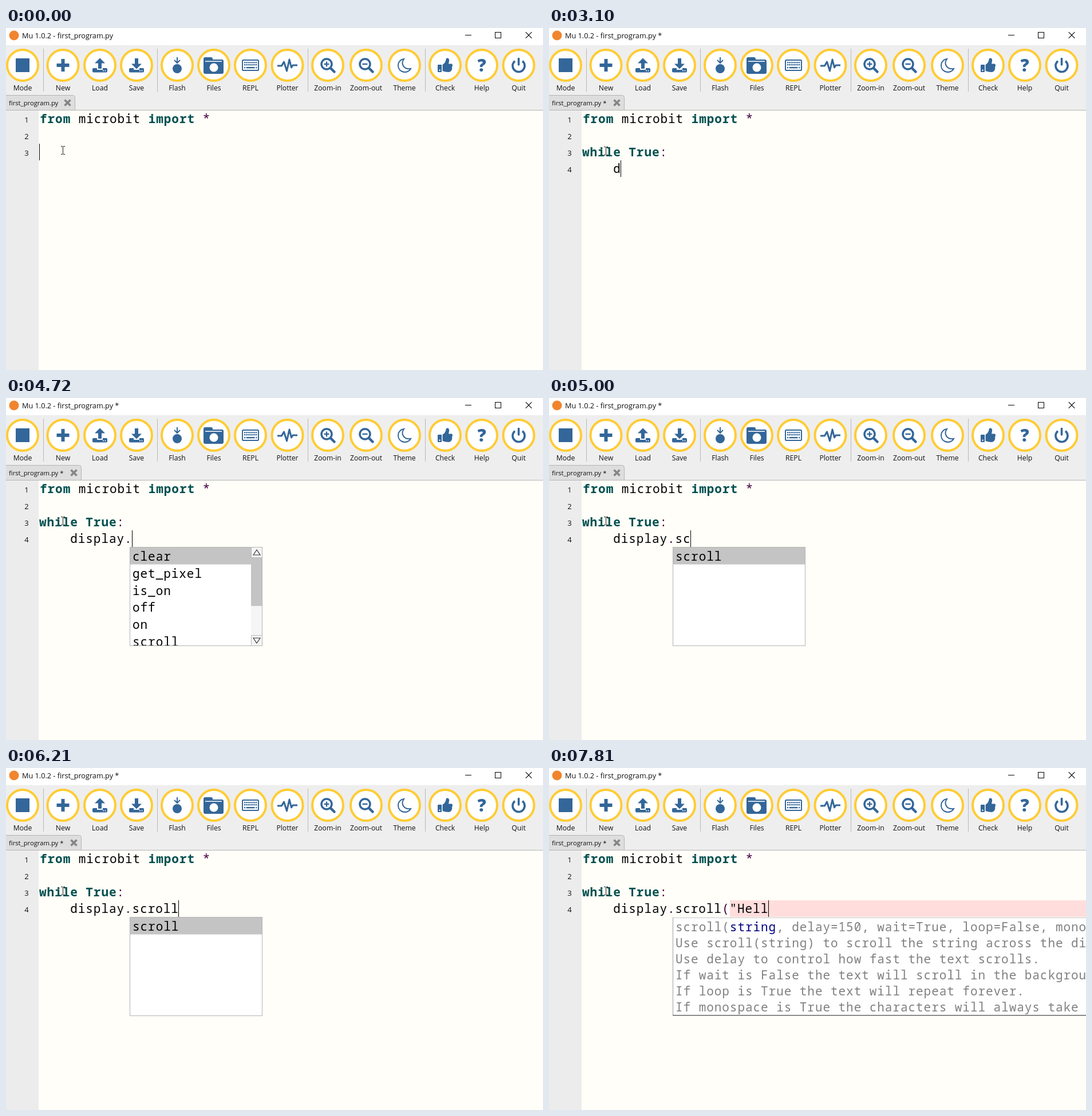
These frames come from a looping animation (938x597 px, 8000 ms). An HTML page with a canvas:

```html
<!DOCTYPE html>
<html lang="en">
<head>
<meta charset="utf-8">
<title>Code editor</title>
<style>
  html, body { margin: 0; width: 100%; height: 100%; overflow: hidden; background: #fff; }
  canvas { display: block; }
</style>
</head>
<body>
<canvas id="stage" width="938" height="597"></canvas>
<script>
const ctx = document.getElementById('stage').getContext('2d');
const LOOP = 8000, ADV = 13.55, CODE_SIZE = 21;
const BLUE = '#336699', KEYWORD = '#005050', OPERATOR = '#400040';
const UI = '"Open Sans", "Noto Sans", sans-serif';
const MONO = '"Noto Sans Mono", "DejaVu Sans Mono", monospace';

const LINE3 = 'while True:';
const KEYS3 = [110, 290, 375, 460, 670, 730, 1170, 1255, 1340, 1550, 2050];
const ENTER = 2440;
const LINE4 = 'display.scroll("Hell';
const KEYS4 = [3100, 3540, 3540, 3660, 3820, 3910, 4000, 4720, 4880, 5000, 5110,
  5160, 5380, 5440, 6270, 7110, 7390, 7570, 7690, 7810];
const CARET_OFF = [[2940, 3100], [5890, 6210], [6670, 7110]];
const POPUPS = [
  { from: 3540, to: 4720, x: 108, items: ['display'] },
  { from: 4720, to: 4880, x: 216, items: ['clear', 'get_pixel', 'is_on', 'off', 'on', 'scroll'], bar: true },
  { from: 4880, to: 5000, x: 216, items: ['scroll', 'set_pixel', 'show'] },
  { from: 5000, to: 5440, x: 216, items: ['scroll'] },
  { from: 5620, to: 6270, x: 216, items: ['scroll'] }
];
const HELP_AT = 6270, QUOTE_AT = 7110;
const HELP = [
  'Use scroll(string) to scroll the string across the display.',
  'Use delay to control how fast the text scrolls.',
  'If wait is False the text will scroll in the background.',
  'If loop is True the text will repeat forever.',
  'If monospace is True the characters will always take up'
];

function rect(x, y, w, h, color) {
  ctx.fillStyle = color;
  ctx.fillRect(x, y, w, h);
}

function frame(x, y, w, h, color) {
  ctx.strokeStyle = color;
  ctx.lineWidth = 1;
  ctx.strokeRect(x + 0.5, y + 0.5, w - 1, h - 1);
}

function path(points, closed) {
  ctx.beginPath();
  points.forEach(([x, y]) => ctx.lineTo(x, y));
  if (closed) ctx.closePath();
}

function stroke(points, color, width, closed) {
  path(points, closed);
  ctx.strokeStyle = color;
  ctx.lineWidth = width;
  ctx.stroke();
}

function fill(points, color) {
  path(points, true);
  ctx.fillStyle = color;
  ctx.fill();
}

function disc(x, y, r, color) {
  ctx.beginPath();
  ctx.arc(x, y, r, 0, 7);
  ctx.fillStyle = color;
  ctx.fill();
}

function ring(x, y, r, width, color, a = 0, b = Math.PI * 2) {
  ctx.beginPath();
  ctx.arc(x, y, r, a, b);
  ctx.strokeStyle = color;
  ctx.lineWidth = width;
  ctx.stroke();
}

function round(x, y, w, h, r, color) {
  ctx.beginPath();
  ctx.roundRect(x, y, w, h, r);
  ctx.fillStyle = color;
  ctx.fill();
}

function cross(x, y, r, color, width) {
  stroke([[x - r, y - r], [x + r, y + r]], color, width);
  stroke([[x - r, y + r], [x + r, y - r]], color, width);
}

function label(text, x, y, size, align = 'left', color = '#111') {
  ctx.font = `${size}px ${UI}`;
  ctx.letterSpacing = '0px';
  ctx.textAlign = align;
  ctx.fillStyle = color;
  ctx.fillText(text, x, y);
}

function code(text, x, y, color = '#000', weight = 400) {
  ctx.font = `${weight} ${CODE_SIZE}px ${MONO}`;
  ctx.letterSpacing = '0.95px';
  ctx.textAlign = 'left';
  ctx.fillStyle = color;
  ctx.fillText(text, x, y);
}

// Draws [text, color, weight] runs on the monospace grid.
function runs(parts, x, y) {
  for (const [text, color, weight] of parts) {
    code(text, x, y, color, weight);
    x += text.length * ADV;
  }
}

// Icons are drawn around the centre of their button.
function tray(dir) {
  round(-13, 5, 26, 7.5, 2, BLUE);
  rect(-5, 4, 10, 4, '#fff');
  disc(6, 9.5, 1, '#fff');
  disc(9.5, 9.5, 1, '#fff');
  rect(-3, dir < 0 ? -5 : -12, 6, 11, BLUE);
  const tip = dir < 0 ? -12.5 : 6.5;
  fill([[0, tip], [9, tip - dir * 9], [-9, tip - dir * 9]], BLUE);
}

function lens(plus) {
  ring(-2, -2, 9, 3.5, BLUE);
  ctx.lineCap = 'round';
  stroke([[5.5, 5.5], [11.5, 11.5]], BLUE, 4.5);
  ctx.lineCap = 'butt';
  rect(-6.5, -3.2, 9, 2.4, BLUE);
  if (plus) rect(-3.2, -6.5, 2.4, 9, BLUE);
}

function keyboard() {
  ctx.beginPath();
  ctx.roundRect(-14, -9, 28, 18, 1.5);
  ctx.strokeStyle = BLUE;
  ctx.lineWidth = 2;
  ctx.stroke();
  for (let row = 0; row < 2; row++)
    for (let i = 0; i < 8; i++) rect(-11 + i * 2.9, -6 + row * 4, 2, 2.4, BLUE);
  rect(-11, 3, 2, 2.4, BLUE);
  rect(-7.5, 3, 15, 2.4, BLUE);
  rect(9.3, 3, 2, 2.4, BLUE);
}

function moon() {
  ctx.beginPath();
  ctx.moveTo(-1, -11);
  ctx.bezierCurveTo(-13, -9, -14, 6, -5, 10.5);
  ctx.bezierCurveTo(1, 13.5, 8, 11.5, 11, 6);
  ctx.bezierCurveTo(-1, 8, -7, -2, -1, -11);
  ctx.closePath();
  ctx.strokeStyle = BLUE;
  ctx.lineWidth = 2;
  ctx.stroke();
}

function thumb() {
  round(-13, -1, 7, 13, 1, BLUE);
  disc(-9.5, 8.8, 1.2, '#fff');
  ctx.beginPath();
  ctx.moveTo(-4.5, -1);
  ctx.bezierCurveTo(-1, -3, 1, -6, 1.5, -10);
  ctx.bezierCurveTo(2, -14, 8, -13, 7, -7);
  ctx.lineTo(6, -2.5);
  ctx.lineTo(11, -2.5);
  ctx.bezierCurveTo(14, -2, 13, 2, 12, 3);
  ctx.bezierCurveTo(13, 6, 11, 12, 6, 12);
  ctx.bezierCurveTo(2, 12, -1, 11, -4.5, 10);
  ctx.closePath();
  ctx.fillStyle = BLUE;
  ctx.fill();
}

const BUTTONS = [
  [29, 'Mode', () => rect(-12, -12, 24, 24, BLUE)],
  [99.5, 'New', () => { rect(-11, -3, 22, 6, BLUE); rect(-3, -11, 6, 22, BLUE); }],
  [164, 'Load', () => tray(-1)],
  [228, 'Save', () => tray(1)],
  [299, 'Flash', () => {
    stroke([[0, -14], [0, -4]], BLUE, 2);
    stroke([[-5, -9], [0, -4], [5, -9]], BLUE, 2);
    disc(0, 6, 8, BLUE);
  }],
  [363, 'Files', () => {
    round(-18, -14, 16, 12, 3, BLUE);
    round(-18, -10, 35, 25, 3, BLUE);
    rect(-15, -7.5, 29, 1.5, '#fff');
    disc(0, 4, 7.5, '#fff');
  }],
  [427, 'REPL', keyboard],
  [491.5, 'Plotter', () => {
    ctx.lineJoin = 'round';
    stroke([[-17.5, 1], [-10, 1], [-6, -6], [-1, 10], [3.5, -10], [7, 4], [9.5, 0], [17.5, 0]], BLUE, 3);
    ctx.lineJoin = 'miter';
  }],
  [562, 'Zoom-in', () => lens(true)],
  [629, 'Zoom-out', () => lens(false)],
  [696, 'Theme', moon],
  [767, 'Check', thumb],
  [831, 'Help', () => {
    ctx.font = `800 30px ${UI}`;
    ctx.letterSpacing = '0px';
    ctx.textAlign = 'center';
    ctx.fillStyle = BLUE;
    ctx.fillText('?', 0, 11);
  }],
  [895.5, 'Quit', () => {
    ring(0, 1, 10.5, 3.6, BLUE, -0.9, Math.PI + 0.9);
    ctx.lineCap = 'round';
    stroke([[0, -11.5], [0, -1]], BLUE, 3.6);
    ctx.lineCap = 'butt';
  }]
];

function drawWindow(changed) {
  const star = changed ? ' *' : '';
  rect(0, 0, 938, 30, '#fff');
  disc(14, 13, 8.5, '#f0852d');
  label('Mu 1.0.2 - first_program.py' + star, 28, 18, 12.7);
  rect(802, 12, 11, 1, '#000');
  frame(854, 7, 11, 11, '#000');
  cross(913, 12.5, 5.3, '#000', 1.1);

  rect(0, 30, 938, 114, '#eee');
  for (const x of [65, 264, 527, 732]) rect(x, 36, 1, 75, '#b8b8b8');
  for (const [x, name, icon] of BUTTONS) {
    disc(x, 65, 27, '#fff');
    ring(x, 65, 27, 4, '#ffcc33');
    ctx.save();
    ctx.translate(x, 65);
    icon();
    ctx.restore();
    label(name, x, 109, 12.2, 'center');
  }

  const edge = changed ? 132 : 121;
  rect(0, 143, 938, 1, '#b4b4b4');
  ctx.beginPath();
  ctx.roundRect(-4.5, 117.5, edge + 4, 26, [0, 4, 0, 0]);
  ctx.fillStyle = '#dedede';
  ctx.fill();
  ctx.strokeStyle = '#b4b4b4';
  ctx.lineWidth = 1;
  ctx.stroke();
  label('first_program.py' + star, 5, 135, 11.25);
  cross(edge - 13.5, 130.5, 5, '#858585', 3.6);

  rect(0, 144, 938, 453, '#fffef8');
  rect(0, 144, 57, 453, '#ececec');
}

function drawLine3(n) {
  const text = LINE3.slice(0, n);
  const word = text.slice(0, 5), value = text.slice(6, 10);
  const style = done => done ? [KEYWORD, 700] : ['#000', 400];
  runs([
    [word, ...style(n >= 5)], [' '],
    [value, ...style(n >= 10)], [text.slice(10), OPERATOR]
  ], 58, 224);
}

function drawLine4(n, t) {
  if (t >= QUOTE_AT) rect(316, 231, 622, 29, '#ffdddd');
  const text = LINE4.slice(0, n);
  const paren = t < QUOTE_AT ? '#f00' : OPERATOR;
  runs([
    [text.slice(0, 7)], [text.slice(7, 8), OPERATOR], [text.slice(8, 14)],
    [text.slice(14, 15), paren], [text.slice(15)]
  ], 58 + 4 * ADV, 253);
}

function drawPointer(y) {
  rect(99, y - 6, 1, 13, '#222');
  for (const end of [y - 7, y + 7]) {
    rect(96, end, 3, 1, '#222');
    rect(100, end, 3, 1, '#222');
  }
}

function drawPopup({ x, items, bar }) {
  rect(x, 260, 232, 173, '#fff');
  ctx.save();
  ctx.beginPath();
  ctx.rect(x + 1, 261, 230, 171);
  ctx.clip();
  rect(x, 261, 232, 29.5, '#c4c4c4');
  items.forEach((item, i) => code(item, x + 5, 284 + i * 29.8));
  if (bar) {
    const left = x + 212;
    rect(left, 261, 20, 172, '#f5f5f5');
    rect(left, 279, 20, 84, '#c4c4c4');
    frame(left, 260, 20, 19, '#bbb');
    frame(left, 414, 20, 19, '#bbb');
    stroke([[left + 4, 274], [left + 10, 265], [left + 16, 274]], '#333', 1.2, true);
    stroke([[left + 4, 419], [left + 10, 428], [left + 16, 419]], '#333', 1.2, true);
  }
  ctx.restore();
  frame(x, 260, 232, 173, '#b4b4b4');
}

function drawHelp() {
  rect(216, 261, 722, 171, '#fff');
  rect(216, 261, 722, 1, '#c8c8c8');
  rect(216, 261, 1, 171, '#a0a0a0');
  rect(216, 431, 722, 1.5, '#666');
  const gray = '#808080';
  runs([
    ['scroll(', gray], ['string', '#000080'],
    [', delay=150, wait=True, loop=False, monospace=False)', gray]
  ], 221, 285);
  HELP.forEach((text, i) => code(text, 221, 313 + i * 28, gray));
}

const typed = (times, t) => times.filter(at => at <= t).length;
const within = (t, from, to) => t >= from && t < to;

function draw(t) {
  const n3 = typed(KEYS3, t), n4 = typed(KEYS4, t);
  const onLine4 = t >= ENTER;
  drawWindow(n3 > 0);
  for (let i = 1; i <= (onLine4 ? 4 : 3); i++) label(i, 36, 136 + i * 29, 13, 'center');
  runs([
    ['from', KEYWORD, 700], [' microbit '], ['import', KEYWORD, 700], [' *', OPERATOR]
  ], 59, 166);
  drawLine3(n3);
  drawLine4(n4, t);

  if (!CARET_OFF.some(([a, b]) => within(t, a, b))) {
    const col = onLine4 ? 4 + n4 : n3;
    rect(Math.max(58, Math.floor(57.5 + col * 13.57)), onLine4 ? 231 : 202, 1, 29, '#000');
  }
  const popup = POPUPS.find(p => within(t, p.from, p.to));
  if (popup) drawPopup(popup);
  if (t >= HELP_AT) drawHelp();
  drawPointer(t < 1170 ? 213 : 214);
}

function tick() {
  draw(performance.now() % LOOP);
  requestAnimationFrame(tick);
}
tick();
</script>
</body>
</html>
```
